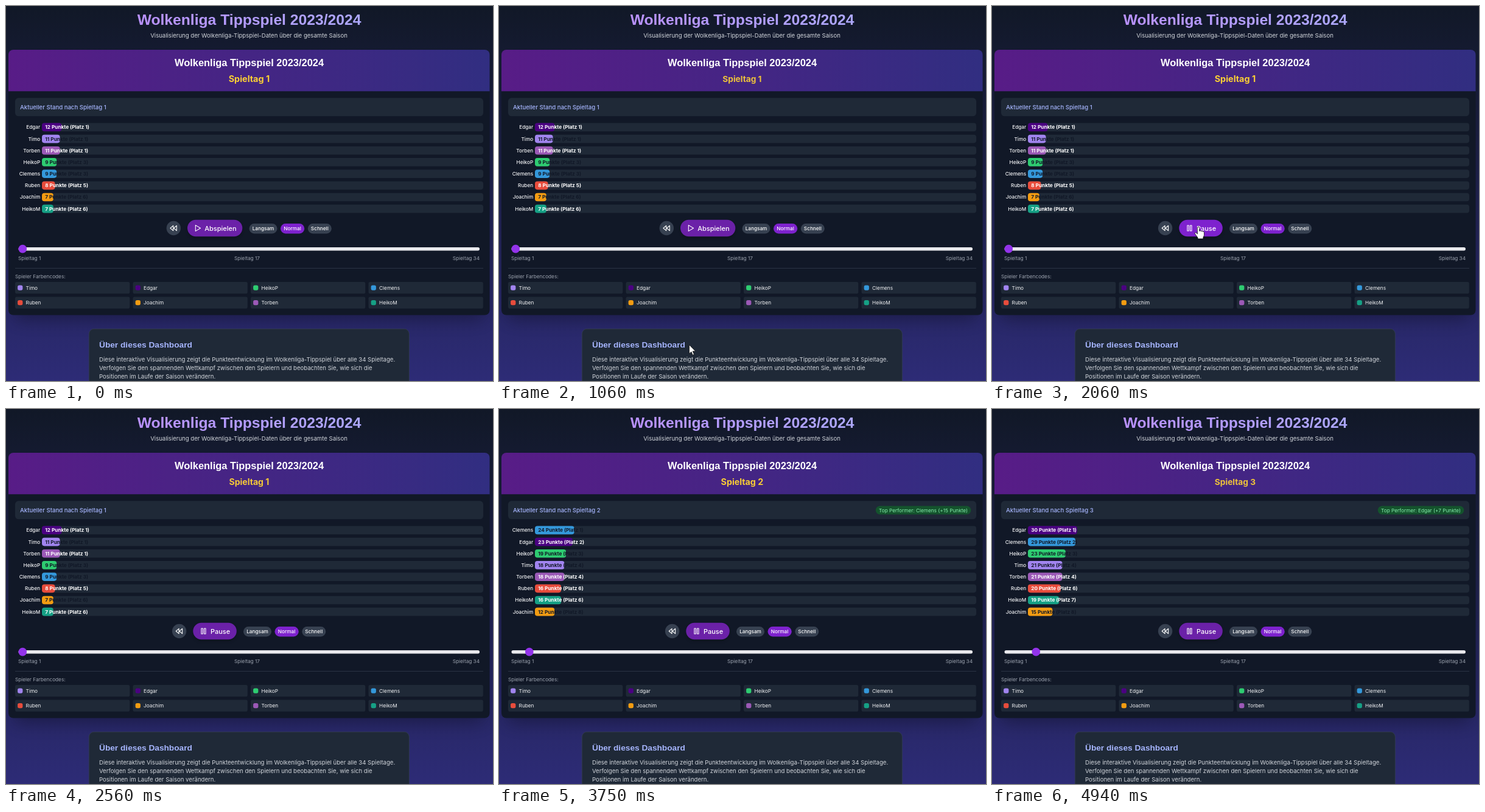
An HTML page for the animation above (5000 ms loop, 800 by 617 pixels).

```html
<!DOCTYPE html>
<html lang="de">
<head>
<meta charset="utf-8">
<title>Wolkenliga Tippspiel</title>
<style>
html, body { margin: 0; width: 100%; height: 100%; overflow: hidden; background: #111827; }
svg { display: block; width: 100%; height: 100%; font-family: Inter, sans-serif; }
.head { font-family: "Liberation Sans", Arial, sans-serif; font-weight: 700; }
text { white-space: pre; }
</style>
</head>
<body>
<svg id="stage" viewBox="0 0 800 617">
  <defs>
    <linearGradient id="page" x1="0" y1="0" x2="0" y2="700" gradientUnits="userSpaceOnUse">
      <stop stop-color="#111827"/><stop offset="1" stop-color="#312e81"/>
    </linearGradient>
    <linearGradient id="band"><stop stop-color="#581c87"/><stop offset="1" stop-color="#312e81"/></linearGradient>
    <linearGradient id="title" x1="4" y1="0" x2="795" y2="0" gradientUnits="userSpaceOnUse">
      <stop stop-color="#c084fc"/><stop offset="1" stop-color="#a5b4fc"/>
    </linearGradient>
    <filter id="blur" x="-10%" y="-20%" width="120%" height="140%"><feGaussianBlur stdDeviation="14"/></filter>
    <filter id="soft" x="-20%" y="-40%" width="140%" height="200%"><feGaussianBlur stdDeviation="2.5"/></filter>
  </defs>
</svg>
<script>
const LOOP = 5000, PLAY = 1900, ROUNDS = [0, 2943, 4075], MOVE = 700;
const ROW = 19.18, UNIT = 2.69, BAR_X = 59;
const S = 8.22, M = 9.59, L = 10.96;
const stage = document.getElementById('stage');

// name, colour, white label, points per round, row per round, place per round
const players = [
  ['Timo', '#a184ef', 0, [11, 18, 21], [1, 3, 3], [1, 4, 4]],
  ['Edgar', '#4b0082', 1, [12, 23, 30], [0, 1, 0], [1, 2, 1]],
  ['HeikoP', '#2ecc71', 0, [9, 19, 23], [3, 2, 2], [3, 3, 3]],
  ['Clemens', '#3498db', 0, [9, 24, 29], [4, 0, 1], [3, 1, 2]],
  ['Ruben', '#e74c3c', 1, [8, 16, 20], [5, 5, 5], [5, 6, 6]],
  ['Joachim', '#f39c12', 0, [7, 12, 15], [6, 7, 7], [6, 8, 8]],
  ['Torben', '#9b59b6', 1, [11, 18, 21], [2, 4, 4], [1, 4, 4]],
  ['HeikoM', '#16a085', 1, [7, 16, 19], [7, 6, 6], [6, 6, 7]]
];
const best = ['', 'Clemens (+15 Punkte)', 'Edgar (+7 Punkte)'];

function el(tag, attrs, parent = stage) {
  const node = document.createElementNS('http://www.w3.org/2000/svg', tag);
  for (const k in attrs) node.setAttribute(k, attrs[k]);
  return parent.appendChild(node);
}
function rect(x, y, width, height, rx, fill, more, parent) {
  return el('rect', { x, y, width, height, rx, fill, ...more }, parent);
}
function text(str, x, y, size, fill, more, parent) {
  const node = el('text', { x, y, 'font-size': size, fill, ...more }, parent);
  node.textContent = str;
  return node;
}
const group = parent => el('g', {}, parent);
const show = (node, on) => node.setAttribute('display', on ? 'inline' : 'none');
const mid = { 'text-anchor': 'middle' }, end = { 'text-anchor': 'end' };
const medium = { 'font-weight': 500 };

function bezier(x1, y1, x2, y2) {
  const at = (a, b, s) => 3 * (1 - s) * (1 - s) * s * a + 3 * (1 - s) * s * s * b + s * s * s;
  return x => {
    if (x <= 0) return 0;
    if (x >= 1) return 1;
    let lo = 0, hi = 1;
    for (let i = 0; i < 24; i++) {
      const s = (lo + hi) / 2;
      if (at(x1, x2, s) < x) lo = s; else hi = s;
    }
    return at(y1, y2, lo);
  };
}
const glide = bezier(.4, 0, .2, 1), easeInOut = bezier(.42, 0, .58, 1);

// page and card
rect(0, 0, 800, 617, 0, 'url(#page)');
text('Wolkenliga Tippspiel 2023/2024', 399.5, 30.5, 24.66, 'url(#title)', { class: 'head', ...mid });
text('Visualisierung der Wolkenliga-Tippspiel-Daten über die gesamte Saison', 399, 52, M, '#d1d5db', mid);
rect(14, 98, 771, 418, 8, '#000', { opacity: .3, filter: 'url(#blur)' });
rect(4, 72, 790.5, 436.5, 8, '#111827');
el('path', { d: 'M4 140.3V80a8 8 0 0 1 8-8H786.5a8 8 0 0 1 8 8V140.3Z', fill: 'url(#band)' });
text('Wolkenliga Tippspiel 2023/2024', 399.5, 99, 16.44, '#fff', { class: 'head', ...mid });
const pulse = group();
const dayTitle = text('', 0, 4.9, 13.7, '#fcd034', { 'font-weight': 700, ...mid }, pulse);

// standings
rect(15, 151.3, 769, 30, 5.5, '#1f2937');
const standing = text('', 23, 170, M, '#a5b4fc', medium);
const pill = group();
const pillBox = rect(622, 159.4, 153, 14.2, 7.1, '#14532d', {}, pill);
const pillText = text('', 770, 169.5, S, '#86efac', end, pill);

const rows = players.map(([name, color, white]) => {
  const g = group();
  rect(BAR_X, -6.85, 725, 13.7, 4.1, '#1f2937', {}, g);
  text(name, 56.2, 3, S, '#f3f4f6', { ...medium, ...end }, g);
  const bar = rect(BAR_X, -6.85, 0, 13.7, 4.1, color, {}, g);
  const label = text('', 64.3, 3, S, white ? '#fff' : '#111827', { 'font-weight': 700 }, g);
  return { g, bar, label };
});

// controls
function chip(x, w, label, fill, parent) {
  rect(x, 358, w, 16.4, 8.2, fill, {}, parent);
  text(label, x + w / 2, 369.1, S, '#fff', { ...medium, ...mid }, parent);
}
function controls(x, width, icon, label, labelX) {
  const g = group();
  el('circle', { cx: x - 22.7, cy: 365.5, r: 11.7, fill: '#374151' }, g);
  const line = { fill: 'none', stroke: '#fff', 'stroke-width': 1.1, 'stroke-linejoin': 'round' };
  const c = x - 22.7;
  el('path', { d: `M${c - .6} 361.3v8.4l-4.8-4.2zM${c + 5} 361.3v8.4l-4.8-4.2z`, ...line }, g);
  rect(x + 1, 355, width - 2, 27, 13.5, '#000', { opacity: .25, filter: 'url(#soft)' }, g);
  const button = rect(x, 351.8, width, 27.4, 13.7, '#6b21a8', {}, g);
  el('path', { d: icon, ...line }, g);
  text(label, labelX, 369.5, L, '#fff', medium, g);
  const right = x + width;
  chip(right + 11.2, 46, 'Langsam', '#374151', g);
  chip(right + 62.7, 39.2, 'Normal', '#7e22ce', g);
  chip(right + 107.5, 39, 'Schnell', '#374151', g);
  return { g, button };
}
const idle = controls(298, 90.3, 'M311.3 360.6v9.8l8.2-4.9z', 'Abspielen', 326.3);
const running = controls(307.3, 71.5, 'M320.9 361h2.4v9h-2.4zM325.6 361h2.4v9h-2.4z', 'Pause', 336);

// slider
rect(20.5, 396.9, 757.5, 5.5, 2.75, '#e9e9ed');
const knob = el('circle', { cy: 399.6, r: 6.8, fill: '#9333ea' });
text('Spieltag 1', 20, 417.6, S, '#9ca3af');
text('Spieltag 17', 396, 417.6, S, '#9ca3af', mid);
text('Spieltag 34', 778, 417.6, S, '#9ca3af', end);
rect(15, 431.1, 769, .7, 0, '#374151');

// legend
text('Spieler Farbencodes:', 15, 448.4, S, '#9ca3af');
players.forEach(([name, color], i) => {
  const x = 15 + i % 4 * 193.5, y = 454 + (i >> 2) * 24.5;
  rect(x, y, 188.3, 19.2, 2.8, '#1f2937');
  rect(x + 4.1, y + 5.4, 8.3, 8.3, 2.7, color);
  text(name, x + 17.6, y + 12.5, S, '#f3f4f6');
});

// about box
rect(136.3, 531.3, 526, 110, 8, '#1f2937', { stroke: '#374151', 'stroke-width': .7 });
text('Über dieses Dashboard', 153, 562, 13.7, '#a5b4fc', { class: 'head' });
['Diese interaktive Visualisierung zeigt die Punkteentwicklung im Wolkenliga-Tippspiel über alle 34 Spieltage.',
 'Verfolgen Sie den spannenden Wettkampf zwischen den Spielern und beobachten Sie, wie sich die',
 'Positionen im Laufe der Saison verändern.'
].forEach((line, i) => text(line, 153, 585.4 + i * 13.7, M, '#d1d5db'));

// pointer
const ink = { fill: '#fff', stroke: '#111', 'stroke-width': .8, 'stroke-linejoin': 'round' };
const arrow = el('path', { d: 'M0 0V14.5L3.4 11.4L5.7 16.8L8 15.8L5.7 10.5H10.2Z', ...ink });
const hand = el('path', {
  d: 'M-1.6 1.4a1.6 1.6 0 0 1 3.2 0V7c.3-1.3 2.7-1.2 2.9.3.5-1.1 2.6-.8 2.8.6.7-.8 2.2-.3 2.2 1.1V13c0 2-1.3 3.2-1.6 4.3V19.5H-1V17.6C-2.5 15.5-4.5 13-5.6 11.2c-.8-1.5.9-2.5 2-1.5L-1.6 11.6Z',
  ...ink
});
const path = [[400, 430, 617], [630, 372, 568], [1000, 312.5, 557.5], [1220, 312.5, 557.5],
  [1650, 339, 363.5], [2120, 339, 363.5], [2280, 334, 380], [2400, 326, 390]];

function pointer(t) {
  const i = path.findIndex(p => p[0] > t);
  if (i < 1) return null;
  const [t0, x0, y0] = path[i - 1], [t1, x1, y1] = path[i];
  const k = easeInOut((t - t0) / (t1 - t0));
  return { x: x0 + (x1 - x0) * k, y: y0 + (y1 - y0) * k };
}

let shown = -1;
function setRound(n) {
  shown = n;
  dayTitle.textContent = 'Spieltag ' + (n + 1);
  standing.textContent = 'Aktueller Stand nach Spieltag ' + (n + 1);
  knob.setAttribute('cx', 27.3 + 22.5 * n);
  show(pill, n > 0);
  pillText.textContent = 'Top Performer: ' + best[n];
  const w = pillText.getComputedTextLength() + 10.6;
  pillBox.setAttribute('width', w);
  pillBox.setAttribute('x', 775.3 - w);
  rows.forEach(({ g, label }, i) => {
    const [, , , points, row, place] = players[i];
    g.setAttribute('transform', `translate(0 ${199.4 + ROW * row[n]})`);
    label.textContent = `${points[n]} Punkte (Platz ${place[n]})`;
  });
}

function draw(t) {
  const n = t >= ROUNDS[2] ? 2 : t >= ROUNDS[1] ? 1 : 0;
  if (n !== shown) setRound(n);

  const k = glide((t - ROUNDS[n]) / MOVE);
  rows.forEach(({ bar }, i) => {
    const pts = players[i][3], from = pts[Math.max(n - 1, 0)];
    bar.setAttribute('width', (from + (pts[n] - from) * k) * UNIT);
  });

  const phase = ((t + 1940) % 2000) / 1000;
  const beat = easeInOut(Math.abs(1 - phase));
  pulse.setAttribute('transform', `translate(399.4 119.6) scale(${1 + .05 * beat})`);
  pulse.setAttribute('opacity', .92 + .08 * beat);

  const p = pointer(t);
  const over = !!p && p.y > 352 && p.y < 379;
  show(arrow, p && !over);
  show(hand, over);
  if (p) (over ? hand : arrow).setAttribute('transform', `translate(${p.x} ${p.y})`);

  const on = t >= PLAY;
  show(idle.g, !on);
  show(running.g, on);
  (on ? running : idle).button.setAttribute('fill', over ? '#7e22ce' : '#6b21a8');
}

const start = performance.now();
function tick() {
  draw((performance.now() - start) % LOOP);
  requestAnimationFrame(tick);
}
tick();
</script>
</body>
</html>
```
